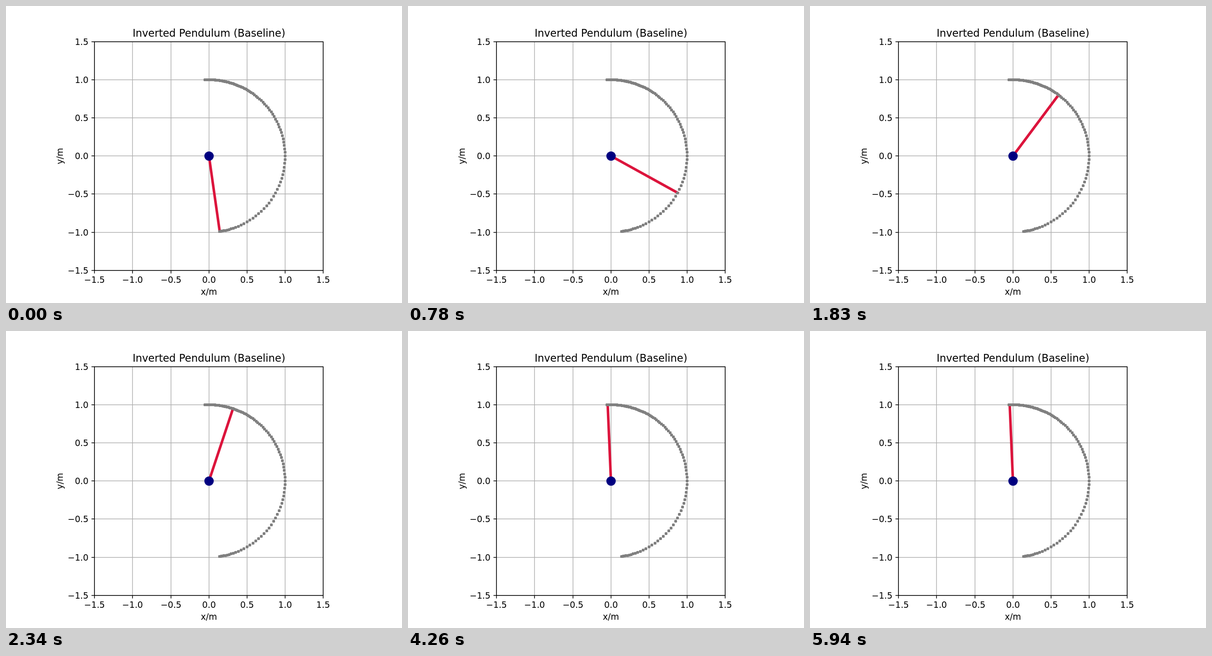
An HTML page with a canvas for the animation above (5.97 s loop, 864x648 px).

```html
<!DOCTYPE html>
<html lang="en">
<head>
<meta charset="utf-8">
<title>Inverted Pendulum</title>
<style>
  html, body { margin: 0; width: 100%; height: 100%; overflow: hidden; background: #fff; }
  canvas { display: block; }
</style>
</head>
<body>
<canvas id="stage" width="864" height="648"></canvas>
<script>
const ctx = document.getElementById("stage").getContext("2d");
const STEPS = 199, STEP_MS = 30;
const CX = 442.8, CY = 327.24, UNIT = 166.32;

// Pendulum angle from upright, in radians, every ten steps
const KNOTS = [3, 2.815, 2.383, 1.867, 1.386, 0.991, 0.668, 0.444, 0.295, 0.19, 0.105,
  0.041, -0.004, -0.029, -0.041, -0.047, -0.05, -0.05, -0.048, -0.045, -0.042];

const knot = i => KNOTS[Math.min(Math.abs(i), KNOTS.length - 1)];

function angle(step) {
  const i = Math.floor(step / 10), u = step / 10 - i;
  const a = knot(i), b = knot(i + 1);
  const va = (b - knot(i - 1)) / 2, vb = (knot(i + 2) - a) / 2;
  return a + u * (va + u * (3 * (b - a) - 2 * va - vb + u * (2 * (a - b) + va + vb)));
}

function tip(step) {
  const a = angle(step);
  return [CX + UNIT * Math.sin(a), CY - UNIT * Math.cos(a)];
}

function line(x1, y1, x2, y2, color, width = 1.5) {
  ctx.strokeStyle = color;
  ctx.lineWidth = width;
  ctx.beginPath();
  ctx.moveTo(x1, y1);
  ctx.lineTo(x2, y2);
  ctx.stroke();
}

function text(str, x, y, size, align = "center") {
  ctx.font = size + "px 'DejaVu Sans', sans-serif";
  ctx.textAlign = align;
  ctx.fillText(str, x, y);
}

const ticks = [-1.5, -1, -0.5, 0, 0.5, 1, 1.5].map(v => ({
  label: v.toFixed(1).replace("-", "\u2212"),
  x: Math.round(CX + v * UNIT),
  y: Math.round(CY - v * UNIT)
}));
const LEFT = 193, RIGHT = 692, TOP = 78, BOTTOM = 577;

function drawGrid() {
  for (const { x, y } of ticks) {
    line(x, TOP, x, BOTTOM, "#b0b0b0");
    line(LEFT, y, RIGHT, y, "#b0b0b0");
  }
}

function drawAxes() {
  ctx.strokeStyle = ctx.fillStyle = "#000";
  ctx.lineWidth = 1.5;
  ctx.strokeRect(LEFT, TOP, RIGHT - LEFT, BOTTOM - TOP);
  for (const { label, x, y } of ticks) {
    line(x, BOTTOM, x, BOTTOM + 6.5, "#000");
    line(LEFT - 6.5, y, LEFT, y, "#000");
    text(label, x, 604, 18.75);
    text(label, 180, y + 7, 18.75, "right");
  }
  text("Inverted Pendulum (Baseline)", CX, 66.5, 22.5);
  text("x/m", CX, 629.5, 18.75);
  ctx.save();
  ctx.translate(124, 327.5);
  ctx.rotate(-Math.PI / 2);
  text("y/m", 0, 0, 18.75);
  ctx.restore();
}

const trail = new Path2D();
for (let i = 0; i < STEPS; i++) {
  const [x, y] = tip(i).map(Math.round);
  trail.roundRect(x - 3, y - 3, 6, 6, 1.5);
}

function draw() {
  const step = Math.floor(performance.now() / STEP_MS) % STEPS;
  ctx.fillStyle = "#fff";
  ctx.fillRect(0, 0, 864, 648);
  drawGrid();
  ctx.lineCap = "square";
  line(CX, CY, ...tip(step), "#dc143c", 5.6);
  ctx.lineCap = "butt";
  ctx.fillStyle = "#808080";
  ctx.fill(trail);
  ctx.fillStyle = "#000080";
  ctx.beginPath();
  ctx.arc(443, 327.5, 10.3, 0, 2 * Math.PI);
  ctx.fill();
  drawAxes();
  requestAnimationFrame(draw);
}
draw();
</script>
</body>
</html>
```
